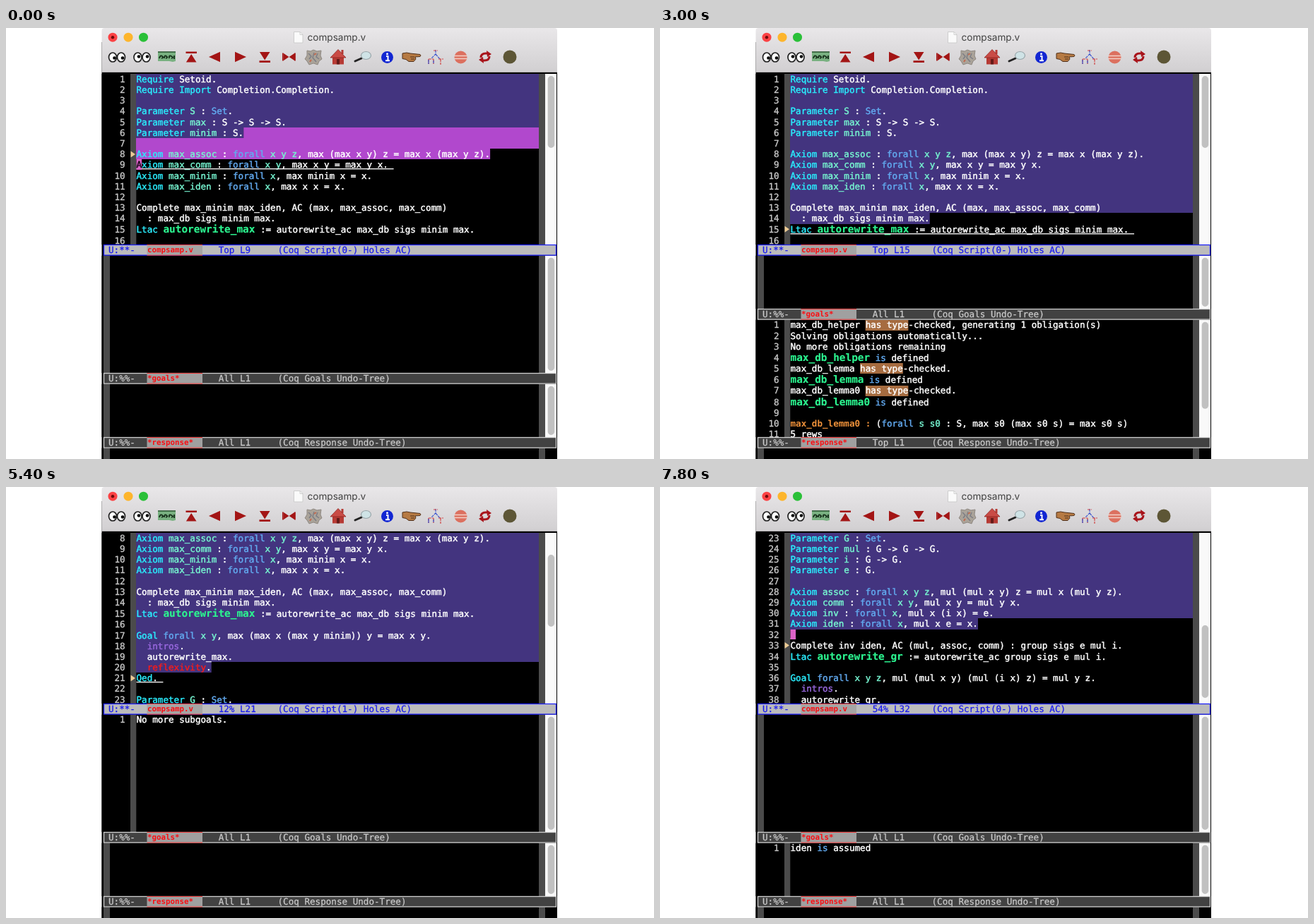
These frames come from a looping animation (917 by 611 pixels, 8 s). An HTML page:

```html
<!DOCTYPE html>
<html lang="en">
<head>
<meta charset="utf-8">
<title>compsamp.v</title>
<style>
  html, body { margin: 0; width: 100%; height: 100%; overflow: hidden; background: #fff; }
  svg { display: block; }
  text { white-space: pre; text-rendering: geometricPrecision; }
  .code { font: 12.6px "DejaVu Sans Mono", Menlo, monospace; color: #fff; stroke-width: .45px; }
  .code, .code tspan { fill: currentColor; stroke: currentColor; }
  .code .k { color: #2aecfc; }
  .code .f { color: #62aaf0; }
  .code .v { color: #76f4d0; }
  .code .b { color: #2cf590; font-size: 14.4px; font-weight: bold; stroke-width: .15px; }
  .code .t { color: #9868de; }
  .code .r { color: #f41c1c; }
  .code .o { color: #f0923a; font-weight: bold; stroke-width: 0; }
  .num { color: #c8c8c8; text-anchor: end; stroke-width: .35px; }
  .mode { stroke-width: .25px; }
  .buf { font: bold 10.8px "DejaVu Sans Mono", Menlo, monospace; fill: #fb0d12; }
  .title { font: 13.6px Inter, "Open Sans", sans-serif; fill: #414141; }
</style>
</head>
<body>
<svg width="917" height="611" viewBox="0 0 917 611">
  <defs>
    <linearGradient id="bar" x2="0" y2="1">
      <stop stop-color="#e9e7e9"/><stop offset="1" stop-color="#d1cfd1"/>
    </linearGradient>
    <g id="eyes" fill="#fff" stroke="#222" stroke-width="1.7">
      <ellipse cx="-6" rx="5.5" ry="6.5"/><ellipse cx="6" rx="5.5" ry="6.5"/>
    </g>
  </defs>
  <rect x="135.500" y="20" width="644.500" height="591"/>
  <path d="M135.500 63V4q0-4 4-4H776q4 0 4 4V63Z" fill="url(#bar)"/>
  <path d="M135.500 62.500H780" stroke="#b0aeb0"/>
  <circle cx="151" cy="13.2" r="6.5" fill="#fb4244"/><circle cx="151" cy="13.2" r="2.2" fill="#6e0a0a"/>
  <circle cx="173" cy="13.2" r="6.5" fill="#fdb52c"/>
  <circle cx="194.5" cy="13.2" r="6.5" fill="#2ac038"/>
  <path d="M407.500 5.500h8.500l4 4V21h-12.500Z" fill="#fafafa" stroke="#c6c6c6" stroke-width=".8"/>
  <path d="M416 5.500v4h4" fill="none" stroke="#c6c6c6" stroke-width=".8"/>
  <text class="title" x="426.500" y="18">compsamp.v</text>

  <use href="#eyes" x="157" y="41.500"/><circle cx="153.500" cy="42.500" r="2.300"/><circle cx="165" cy="42.500" r="2.300"/>
  <use href="#eyes" x="192.500" y="41.500"/><circle cx="188" cy="40.500" r="2.300"/><circle cx="200" cy="40.500" r="2.300"/>
  <path d="M215 34h25v13l-4 1-5-1H215Z" fill="#79b181"/>
  <path d="M215 34h25" stroke="#2c5a34" stroke-width="1.600"/>
  <path d="M217 43q1-5 4-3t-1 3m4 0q0-5 3-3t-1 3m5 0q-1-5 3-3t0 3m4 1v-5" fill="none" stroke="#142c18" stroke-width="1.800"/>
  <g fill="#a31515">
    <path d="M254.500 33.500h15.500v2.600h-15.500ZM262.200 37l7.300 11.500h-14.600Z"/>
    <path d="M287 41l16-7.300v14.600Z"/>
    <path d="M340 41l-16-7.300v14.600Z"/>
    <path d="M358.500 46.300h15.500v2.600h-15.500ZM366.200 45.400l7.300-11.500h-14.600Z"/>
    <path d="M391 35.500h1.800v11H391ZM408 35.500h1.800v11H408ZM393 36l7.400 5-7.400 5ZM408 36l-7.400 5 7.400 5Z"/>
  </g>
  <path d="M426 32l5 1 4-2 5 2 6-1-1 7 2 5-4 3-2 5-6-2-6 2-3-5-3-3 3-5Z" fill="#aaa399" stroke="#8e8882"/>
  <path d="M428 36l4 4-3 4m7-9l-2 7 5 6m2-12l-2 5 4 3" fill="none" stroke="#7b7c84" stroke-width="1.4"/>
  <path d="M436 38l3-2m-9 12l2-3" stroke="#c26a50" stroke-width="2"/>
  <path d="M474.500 31h3v6h-3ZM462 41h16v10.500h-16Z" fill="#b63a34"/>
  <path d="M459 42l11-11.500L481 42Z" fill="#c94b45" stroke="#8e2622" stroke-width=".8"/>
  <path d="M468 44h4v7.500h-4Z" fill="#651b19"/>
  <path d="M494 47l9-4" stroke="#222" stroke-width="3" stroke-linecap="round"/>
  <ellipse cx="509.500" cy="39" rx="7" ry="5.500" fill="#cfe3e6" stroke="#98a5a9" stroke-width="1.200"/>
  <circle cx="539.500" cy="41.500" r="8.500" fill="#1226d2"/>
  <path d="M538 40h2.500v6M537 46.200h6" fill="none" stroke="#fff" stroke-width="2"/>
  <circle cx="539.500" cy="36.800" r="1.500" fill="#fff"/>
  <path d="M561 36l6-1 5 1 14 1.500q2 1.500 0 3l-7 .5 1 3-3 3.500h-7l-4-3-5-1Z" fill="#b67a43" stroke="#50301a"/>
  <path d="M572 41h6m-5 3h5" stroke="#50301a"/>
  <g fill="none" stroke-width="1.200">
    <path d="M608 31v6l-6 6m6-6l6 7" stroke="#3a53cf" stroke-dasharray="4 1"/>
    <path d="M605 32h6M598 44h7m-7 0v7m7-7v7M612 44h7m-4 0v8" stroke="#d04343" stroke-dasharray="4 1"/>
    <path d="M598 45v6M605 46v4" stroke="#3a53cf"/>
  </g>
  <circle cx="643.500" cy="41.500" r="9" fill="#dc705f"/>
  <path d="M634.500 39.500h18m-18 4h18" stroke="#f3d1c8" stroke-width="1.500"/>
  <g fill="none" stroke="#a8141b" stroke-width="3">
    <path d="M672 42q0-6 7-6h3M684 40q0 6-7 6h-3"/>
  </g>
  <path d="M680 32l7 5-6 4ZM676 50l-7-5 6-4Z" fill="#a8141b"/>
  <circle cx="713" cy="41" r="9.500" fill="#5d5636"/>
  <g id="view"></g>
</svg>
<script>
const CW = 12.6 * 0.602, BOLD = 14.4 * 0.602, X = 184.5, ROW = 15.18;
const LOOP = 8000, STEP = 600;
const LEFT = 135.5, WIDTH = 644.5;

const script = `Require Setoid.
Require Import Completion.Completion.

Parameter S : Set.
Parameter max : S -> S -> S.
Parameter minim : S.

Axiom max_assoc : forall x y z, max (max x y) z = max x (max y z).
Axiom max_comm : forall x y, max x y = max y x.
Axiom max_minim : forall x, max minim x = x.
Axiom max_iden : forall x, max x x = x.

Complete max_minim max_iden, AC (max, max_assoc, max_comm)
  : max_db sigs minim max.
Ltac autorewrite_max := autorewrite_ac max_db sigs minim max.

Goal forall x y, max (max x (max y minim)) y = max x y.
  intros.
  autorewrite_max.
  reflexivity.
Qed.

Parameter G : Set.
Parameter mul : G -> G -> G.
Parameter i : G -> G.
Parameter e : G.

Axiom assoc : forall x y z, mul (mul x y) z = mul x (mul y z).
Axiom comm : forall x y, mul x y = mul y x.
Axiom inv : forall x, mul x (i x) = e.
Axiom iden : forall x, mul x e = x.

Complete inv iden, AC (mul, assoc, comm) : group sigs e mul i.
Ltac autorewrite_gr := autorewrite_ac group sigs e mul i.

Goal forall x y z, mul (mul x y) (mul (i x) z) = mul y z.
  intros.
  autorewrite_gr.`.split('\n');

const report = `max_db_helper has type-checked, generating 1 obligation(s)
Solving obligations automatically...
No more obligations remaining
max_db_helper is defined
max_db_lemma has type-checked.
max_db_lemma is defined
max_db_lemma0 has type-checked.
max_db_lemma0 is defined

max_db_lemma0 : (forall s s0 : S, max s0 (max s0 s) = max s0 s)
5 rews`;

const rule = '  ' + '='.repeat(28);
const goal1 = `1 subgoal, subgoal 1 (ID 3071)\n\n${rule}\n   forall x y : S, max (max x (max y minim)) y = max x y`;
const goal2 = `1 subgoal, subgoal 1 (ID 3073)\n\n  x, y : S\n${rule}\n   max (max x (max y minim)) y = max x y`;

// first visible line -> position label, scroll thumb top and height
const pages = {
  1: ['Top', 68, 102], 8: ['12%', 96, 102], 16: ['44%', 172, 81], 23: ['54%', 196, 103]
};

const steps = [
  { top: 1, lock: 6, queue: 8, line: 9, mark: 8, block: 1 },
  { top: 1, lock: 9, line: 10, mark: 10, block: 1, msg: 'max_comm is assumed' },
  { top: 1, lock: 10, line: 11, mark: 11, block: 1, msg: 'max_minim is assumed' },
  { top: 1, lock: 11, line: 12, mark: 13, msg: 'max_iden is assumed' },
  { top: 1, lock: 14, line: 15, mark: 15, block: 1, msg: report, tall: 1 },
  { top: 1, lock: 14, line: 15, mark: 15, msg: report, tall: 1 },
  { top: 1, lock: 15, line: 16, msg: 'autorewrite_max is defined' },
  { top: 8, lock: 17, line: 18, mark: 18, goals: goal1, at: 4, depth: 1 },
  { top: 8, lock: 18, line: 19, mark: 19, goals: goal2, at: 5, depth: 1 },
  { top: 8, lock: 20, line: 21, mark: 21, goals: 'No more subgoals.', depth: 1 },
  { top: 16, lock: 23, line: 24, mark: 24, block: 1, msg: 'G is assumed' },
  { top: 16, lock: 25, line: 26, mark: 26, block: 1, msg: 'i is assumed' },
  { top: 16, lock: 28, queue: 29, line: 30, mark: 29, block: 1, msg: 'assoc is assumed' },
  { top: 23, lock: 31, line: 32, mark: 33, block: 1, msg: 'iden is assumed' }
];

const syntax = new RegExp([
  '(?<k>^(?:Require|Parameter|Axiom|Ltac|Goal|Qed)\\b|(?<=Require )Import)',
  '(?<f>\\b(?:forall|Set|is)\\b)',
  '(?<v>(?<=^(?:Parameter|Axiom) )\\w+|(?<=forall )[\\w ]*\\w)',
  '(?<b>(?<=^Ltac )\\w+|^\\w+(?= is defined))',
  '(?<t>intros)', '(?<r>reflexivity)', '(?<o>^\\w+ :(?= \\())'
].join('|'), 'g');

const paint = s => s.replace(syntax, (m, ...rest) => {
  const groups = rest[rest.length - 1];
  return `<tspan class="${Object.keys(groups).find(k => groups[k])}">${m}</tspan>`;
});
const bigName = s => (s.match(/(?<=^Ltac )\w+|^\w+(?= is defined)/) || [''])[0].length;
const width = s => s.length * CW + bigName(s) * (BOLD - CW);
const rect = (x, y, w, h, fill, more = '') =>
  `<rect x="${x}" y="${y}" width="${w}" height="${h}" fill="${fill}" ${more}/>`;
const text = (x, y, s, cls = '', more = '') =>
  `<text class="code ${cls}" x="${x}" y="${y}" ${more}>${s}</text>`;

function frame(y, end, thumbY, thumbH, numbered) {
  return rect(LEFT, y, WIDTH, end - y, '#000') +
    rect(numbered ? 176 : 138, y, numbered ? 8.3 : 9, end - y, '#4b4b4b') +
    rect(754, y, 9, end - y, '#4b4b4b') + rect(763, y, 16, end - y, '#f9f9f9') +
    rect(766.7, thumbY, 9.4, thumbH, '#c1c1c1', 'rx="4.7"');
}

function rows(y, lines, first = 1, st = {}) {
  let back = '', front = '';
  lines.forEach((s, i) => {
    const n = first + i, big = bigName(s) ? 1 : 0, h = ROW + big;
    const base = y + 11.9 + big, end = X + width(s);
    const y0 = Math.round(y), y1 = Math.round(y + h);
    const fill = (a, b, c) => { back += rect(a, y0, b - a, y1 - y0, c); };
    if (n < st.lock) fill(184, 754, '#43347f');
    else if (n === st.lock) {
      fill(184, end, '#43347f');
      if (st.queue) fill(end, 754, '#b148cd');
    } else if (n < st.queue) fill(184, 754, '#b148cd');
    else if (n === st.queue) fill(184, end, '#b148cd');
    const typed = s.indexOf('has type');
    if (typed >= 0) fill(X + typed * CW, X + (typed + 8) * CW, '#a66c40');

    front += text(168.6, base, n, 'num') + text(X, base, paint(s));
    if (n === st.mark) front += `<path d="M176.500 ${y + 3.2}l6.500 4.500-6.500 4.500Z" fill="#eccb94"/>`;
    if (n === st.line) {
      front += rect(X, base + 0.7, width(s) + CW, 1.3, '#fff');
      if (st.block) front += rect(X, y0, CW, y1 - y0 - 1, '#dc62c8') +
        text(X, base, s[0] || '', '', 'style="color:#180818"');
    }
    y += h;
  });
  return back + front;
}

function modeLine(y, name, pos, mode, active) {
  const [bg, edge, ink] = active ? ['#bcbcbc', '#1f22f5', '#1a1cf0'] : ['#424242', '#cfcfcf', '#cbcbcb'];
  const put = (x, s) => text(x, y + 11.6, s, 'mode', `style="color:${ink}"`);
  return rect(138.5, y + 0.5, 640, 14.6, bg, `stroke="${edge}" stroke-width="1.3"`) +
    rect(199.5, y + 0.5, 78.5, 14.6, active ? '#a5a5a5' : '#a0a0a0') +
    rect(199.5, y, 78.5, 1, '#f03a3a') + rect(199.5, y + 14.6, 78.5, 1, '#f03a3a') +
    `<text class="buf" x="200" y="${y + 11.4}">${name}</text>` +
    put(145, active ? 'U:**-' : 'U:%%-') + put(300.7, pos) + put(384.5, `(Coq ${mode})`);
}

function render(st) {
  const [pos, thumbY, thumbH] = pages[st.top];
  const split = st.tall ? 398 : 489, low = split + 15.8;
  const pane = (y, end, body, thumb) =>
    frame(y, end, y + 3, thumb || end - y - 6, body) + (body ? rows(y - 0.3, body.split('\n')) : '');
  return frame(65, 307, thumbY, thumbH, true) +
    rows(65, script.slice(st.top - 1, st.top + 15), st.top, st) +
    pane(322.7, split, st.goals) +
    pane(low, 580, st.msg, st.tall && 123) +
    rect(LEFT, 595.5, WIDTH, 15.5, '#000') +
    rect(138, 596, 9, 15, '#4b4b4b') + rect(754, 596, 9, 15, '#4b4b4b') +
    modeLine(307, 'compsamp.v', `${pos} L${st.line}`, `Script(${st.depth || 0}-) Holes AC`, true) +
    modeLine(split, '*goals*', `All L${st.at || 1}`, 'Goals Undo-Tree') +
    modeLine(580, '*response*', `${st.tall ? 'Top' : 'All'} L1`, 'Response Undo-Tree');
}

const view = document.getElementById('view');
let shown = -1;
function tick() {
  const i = Math.floor(performance.now() % LOOP / STEP);
  if (i !== shown) view.innerHTML = render(steps[shown = i]);
  requestAnimationFrame(tick);
}
tick();
</script>
</body>
</html>
```
